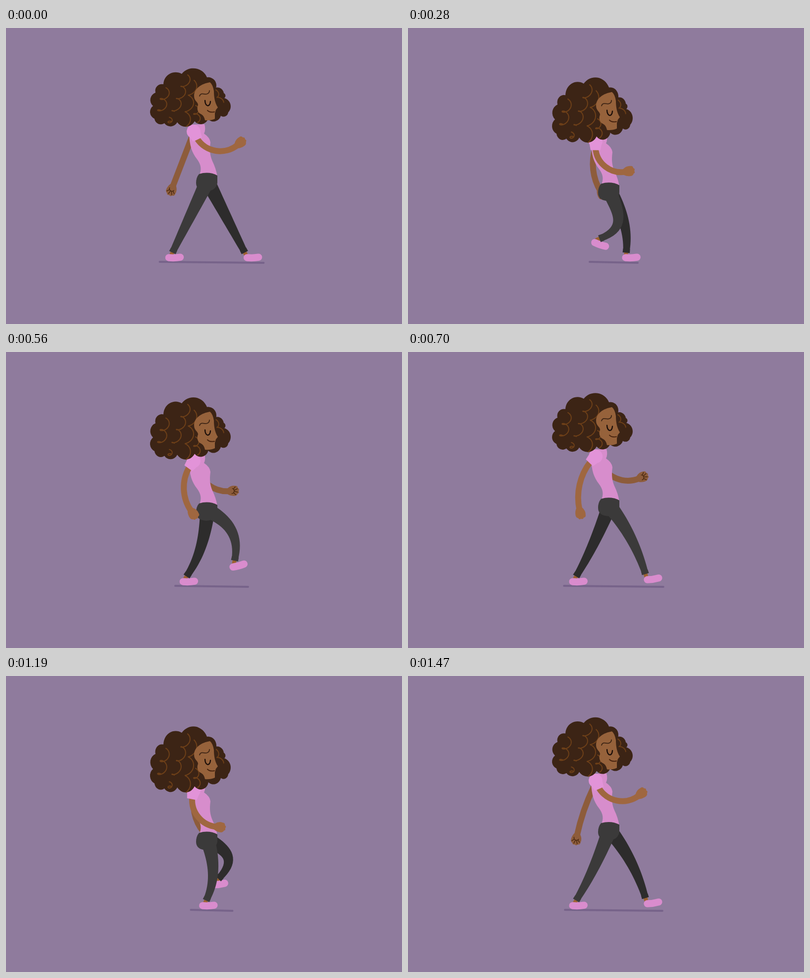
Recreate the animation shown at these times as an HTML page with a canvas. Size 800 by 600 pixels, loop 1.54 s.

```html
<!DOCTYPE html>
<html>
<head>
<meta charset="utf-8">
<style>
html, body { margin: 0; width: 100%; height: 100%; overflow: hidden; background: #8f7b9d; }
canvas { display: block; }
</style>
</head>
<body>
<canvas id="stage" width="800" height="600"></canvas>
<script>
const ctx = document.getElementById('stage').getContext('2d');
const STEP = 70, COUNT = 22, HALF = 11, RAD = Math.PI / 180;
const LEG = 158, STRIDE = 158.2, BACK_X = 340.5, FLOOR_Y = 465.5, HIP_X = 407;
const { sin, cos, sqrt, hypot, atan2, max, PI } = Math;
const color = {
  bg: '#8f7b9d', ground: '#77638a', hair: '#3c2415', curl: '#6d3f18', face: '#96623b',
  nearSkin: '#9f6740', farSkin: '#8d5c3b', ankle: '#9c6130', shirt: '#d78dcc', sleeve: '#e293d8',
  shoe: '#d98ccd', nearPants: '#3b3a3a', farPants: '#2d2c2c', ink: '#1c0f0a', crease: '#4a2911'
};

const ease = s => s * s * (3 - 2 * s);
// 0 to 1 over the first step, back to 0 over the second
const swing = k => k < HALF ? ease(k / HALF) : 1 - ease((k - HALF) / HALF);

// The body sinks to its lowest point at steps 5 and 17
function sink(k) {
  const keys = [0, 5, 11, 17, 22];
  let i = 0;
  while (k >= keys[i + 1]) i++;
  const s = ease((k - keys[i]) / (keys[i + 1] - keys[i]));
  return i % 2 ? 1 - s : s;
}

function fill(path, c) { ctx.fillStyle = c; ctx.fill(new Path2D(path)); }
function stroke(path, c, w) {
  ctx.strokeStyle = c;
  ctx.lineWidth = w;
  ctx.stroke(new Path2D(path));
}
function at(x, y, angle, draw) {
  ctx.save();
  ctx.translate(x, y);
  ctx.rotate(angle);
  draw();
  ctx.restore();
}
function shifted(dy, sy, draw) {
  ctx.save();
  ctx.translate(0, dy);
  ctx.scale(1, sy);
  draw();
  ctx.restore();
}

// Closed outline of round lumps, clockwise
const lumps = pts => pts.map(([x, y], i) => {
  if (!i) return `M${x} ${y}`;
  const r = .58 * hypot(x - pts[i - 1][0], y - pts[i - 1][1]);
  return `A${r} ${r} 0 0 1 ${x} ${y}`;
}).join('') + 'Z';

// A strand that winds n times on its way down
function strand(x, y, dx, dy, r, n) {
  let path = '';
  for (let i = 0; i <= 60; i++) {
    const s = i / 60, a = 2 * PI * n * s;
    path += `${i ? 'L' : 'M'}${x + dx * s + r * sin(a)} ${y + dy * s + .7 * r * (1 - cos(a))}`;
  }
  return path;
}

const backHair = lumps([[408, 185], [381, 189], [346, 191], [320, 193], [300, 184], [297, 158],
  [302, 131], [318, 114], [355, 93], [406, 100], [424, 122]]);
const frontHair = lumps([[419, 123], [440, 132], [441, 142], [449, 171], [434, 178], [408, 185]]);
const curls = strand(323, 121, -10, 46, 8, 2) + strand(367, 95, -27, 74, 7, 3) +
  strand(380, 106, -16, 84, 7, 2.5) + strand(383, 157, 4, 26, 6, 1.5) + strand(330, 181, 3, 8, 5, 1);
const frontCurl = strand(423, 125, 13, 22, 4, 1.3);

function leg(k, drop, pants) {
  const s = k % HALF / HALF, p = ease(s), swinging = k % COUNT >= HALF;
  const lift = swinging ? 44 * sin(PI * s ** 1.25) ** 2 : 0;
  const tilt = swinging ? sin(2 * PI * s) * (12 + 62 * (1 - s) ** 3) : 0;
  const footX = BACK_X + STRIDE * (swinging ? p : 1 - p), footY = FLOOR_Y - lift;

  const hipY = 310 + drop;
  const x = footX - 3 - .16 * max(0, footX - HIP_X) + .17 * lift, y = footY - 13;
  const dx = x - HIP_X, dy = y - hipY, d = hypot(dx, dy);

  // The shorter the reach, the further the knee bends forward
  const bend = sqrt(max(0, LEG * LEG - d * d)) / d;
  const thigh = bend * (swinging ? .1 + .17 * p : .13), shin = bend * (swinging ? .5 - .25 * p : .18);
  const bx = HIP_X + dx / 3 + dy * thigh, by = hipY + dy / 3 - dx * thigh;
  const cx = HIP_X + dx * 2 / 3 + dy * shin, cy = hipY + dy * 2 / 3 - dx * shin;

  const left = [], right = [];
  for (let i = 0; i <= 20; i++) {
    const t = i / 20, m = 1 - t;
    const point = (a, b, c, e) => m * m * m * a + 3 * m * m * t * b + 3 * m * t * t * c + t * t * t * e;
    const slope = (a, b, c, e) => m * m * (b - a) + 2 * m * t * (c - b) + t * t * (e - c);
    const vx = slope(HIP_X, bx, cx, x), vy = slope(hipY, by, cy, y);
    const w = (30 - 17 * t) / 2 / hypot(vx, vy);
    const px = point(HIP_X, bx, cx, x), py = point(hipY, by, cy, y);
    left.push(`${px - vy * w} ${py + vx * w}`);
    right.unshift(`${px + vy * w} ${py - vx * w}`);
  }
  const end = atan2(y - cy, x - cx);
  at(x, y, end, () => stroke('M0 0L8 0', color.ankle, 8));
  at(footX, footY, tilt * RAD, () => stroke('M-11.5 0Q0 1.2 11.5 -.8', color.shoe, 14.5));
  fill('M' + left.concat(right).join('L') + 'Z', pants);
  at(x, y, end, () => fill('M-5 -7L3 -7.3L3 7.3L-5 7Z', pants));
}

// Circular arc from the shoulder, given its chord and how far it turns
function arm(sx, sy, angle, chord, turn, skin, creases) {
  const a = (angle + turn / 2) * RAD, b = (angle - turn / 2) * RAD;
  const h = chord / 3 / cos(turn / 4 * RAD) ** 2;
  const x = sx + chord * cos(angle * RAD), y = sy + chord * sin(angle * RAD);
  stroke(`M${sx} ${sy}C${sx + h * cos(a)} ${sy + h * sin(a)} ${x - h * cos(b)} ${y - h * sin(b)} ${x} ${y}`, skin, 12);
  at(x, y, b, () => {
    fill('M-4 -6Q4 -12 12 -10Q17 -10 17 -5Q21 -3 18 1Q20 5 16 6Q14 11 7 10Q0 9 -4 6Z', skin);
    if (creases) stroke('M6 -5Q10 -3 9 1Q8 5 4 5M9 -1L16 -4M9 1L16 3M8 4L12 8M8 -4L12 -8', color.crease, 1.5);
  });
}

function farArm(p) {
  arm(375 + 13 * p, 222, 111 - 91 * p, 107 - 75 * p + 55 * p * p, 90 * sqrt(p), color.farSkin, true);
}

function nearArm(p) {
  const angle = 9 + 96 * p, turn = 98 - 50 * p * p;
  const sleeve = (angle + turn / 2 + 6) * RAD;
  arm(379 + 15 * cos(sleeve), 210 + 15 * sin(sleeve), angle, 84 - 44 * p + 62 * p * p, turn, color.nearSkin, false);
  at(379, 210, sleeve, () => fill('M18 -10L7 -12A14 14 0 1 0 7 12L18 10Z', color.sleeve));
}

function head(v) {
  shifted(8.7 * v, 1 + .113 * v, () => {
    fill(frontHair, color.hair);
    stroke(frontCurl, color.curl, 2);
  });
  shifted(10.2 * v, 1 + .128 * v, () => {
    fill(backHair, color.hair);
    stroke(curls, color.curl, 2);
  });
  shifted(22 * v, 1, () => {
    fill(`M412 110C395 113 380 122 380 138C380 148 388 150 388 156C385 163 387 171 393 174
      C399 177 401 182 402 187Q413 188 422 184L422 173L424 166L428 161C422 152 420 140 420 128Q418 115 412 110Z`, color.face);
    stroke('M391 138C393 130 401 135 405 134C409 133 411 131 411 127', color.hair, 1.8);
    stroke('M402 147C402 159 412 162 413 149', color.ink, 2.4);
    stroke('M407 167Q412 172 421 170', '#47230f', 2);
  });
}

function draw(k) {
  const v = sink(k), drop = 22 * v, half = 105 - 63 * v, p = swing(k);
  ctx.fillStyle = color.bg;
  ctx.fillRect(0, 0, 800, 600);
  ctx.lineCap = ctx.lineJoin = 'round';
  stroke(`M${415.5 - half} 474L${415.5 + half} 476`, color.ground, 4);

  shifted(drop, 1, () => farArm(p));
  leg(k, drop, color.farPants);
  shifted(drop, 1, () => fill(`M374 196L401 195Q404 206 400 214Q412 222 413 232C411 248 412 258 417 270
    Q424 284 427 301L390 300C396 286 394 277 386 266C375 252 371 238 370 215Z`, color.shirt));
  leg(k + HALF, drop, color.nearPants);
  shifted(drop, 1, () => {
    fill('M390 296Q410 290 427 299L427 314Q424 330 405 331Q384 330 384 314Q384 303 390 296Z', color.nearPants);
    nearArm(p);
  });
  head(v);
}

const start = performance.now();
function tick() {
  draw(Math.floor((performance.now() - start) / STEP) % COUNT);
  requestAnimationFrame(tick);
}
tick();
</script>
</body>
</html>
```
